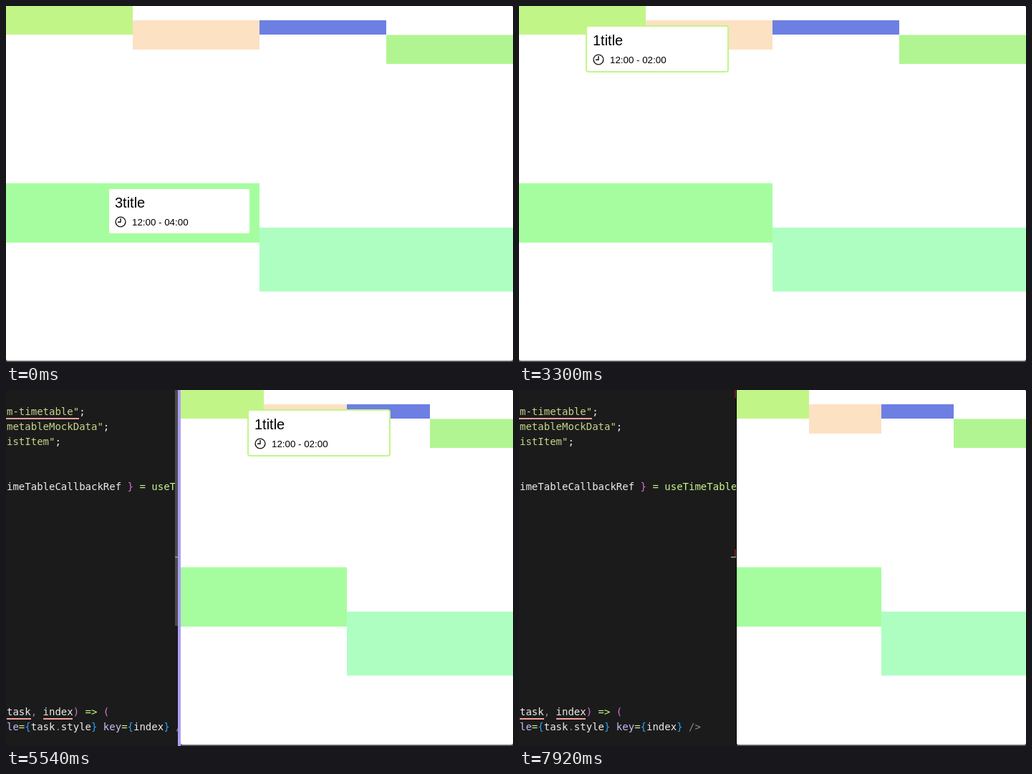
Recreate the animation shown at these times as an HTML page with a canvas. Size 708x498 px, loop 7990 ms.

```html
<!DOCTYPE html>
<html lang="en">
<head>
<meta charset="utf-8">
<title>Resizable timetable</title>
<style>
html, body { margin: 0; width: 100%; height: 100%; overflow: hidden; background: #fff; }
canvas { display: block; width: 708px; height: 498px; }
</style>
</head>
<body>
<canvas id="stage" width="708" height="498"></canvas>
<script>
const ctx = document.getElementById('stage').getContext('2d');
const W = 708, H = 498, LOOP = 7990, STEP = 70;

const LIME = '#c2f587', PEACH = '#fce1c3', BLUE = '#6d7fe3', GREEN = '#a6fd9f';

// Column start and span are fractions of the pane width.
const tasks = [
  { col: 0, span: .25, top: 0, bottom: 40, color: LIME },
  { col: .25, span: .25, top: 20, bottom: 61, color: PEACH },
  { col: .5, span: .25, top: 20, bottom: 40, color: BLUE },
  { col: .75, span: .25, top: 40.5, bottom: 81, color: '#b0f592' },
  { col: 0, span: .5, top: 248, bottom: 331, color: GREEN },
  { col: .5, span: .5, top: 310, bottom: 399.5, color: '#aefec2' }
];

const cards = [
  { from: 0, to: 500, x: 142, y: 254, title: '3title', time: '12:00 - 04:00', color: GREEN },
  { from: 640, to: 1340, x: 282.5, y: 31, title: '4title', time: '01:00 - 02:00', color: BLUE },
  { from: 1410, to: 1900, x: 139.5, y: 36, title: '2title', time: '01:00 - 03:00', color: PEACH },
  { from: 2670, to: 3300, x: 117.5, y: 34, title: '2title', time: '01:00 - 03:00', color: PEACH },
  { from: 3300, to: 7360, x: 93, y: 27, title: '1title', time: '12:00 - 02:00', color: LIME }
];

const STRING = '#c6d58a', PLAIN = '#ececec', CALL = '#c8f58c', PINK = '#da70d6',
      BRACE = '#2ba3f7', ATTR = '#cbbcfa', DIM = '#8a8a8a';

const code = [
  { y: 35, parts: [['m-timetable"', STRING], [';', PLAIN]] },
  { y: 56, parts: [['metableMockData"', STRING], [';', PLAIN]] },
  { y: 77, parts: [['istItem"', STRING], [';', PLAIN]] },
  { y: 140, parts: [['imeTableCallbackRef ', PLAIN], ['} ', PINK], ['= useTimeTable', CALL], ['(', PINK]] },
  { y: 455, parts: [['task', PLAIN], [', ', DIM], ['index', PLAIN], [') ', PINK], ['=> ', CALL], ['(', PINK]] },
  { y: 476, parts: [['le', ATTR], ['=', CALL], ['{', BRACE], ['task', PLAIN], ['.', DIM], ['style', PLAIN], ['} ', BRACE],
    ['key', ATTR], ['=', CALL], ['{', BRACE], ['index', PLAIN], ['} ', BRACE], ['/>', DIM]] }
];
const underlines = [[0, 102, 39], [1, 35, 459], [52, 93, 459]];

const dragPath = [[4770, 0], [4840, 4], [5190, 96], [5540, 244], [5610, 268], [5890, 312], [6030, 314], [6170, 316]];

function slopeAt(i) {
  const a = dragPath[Math.max(i - 1, 0)], b = dragPath[Math.min(i + 1, dragPath.length - 1)];
  return (b[1] - a[1]) / (b[0] - a[0]);
}

function paneLeft(t) {
  if (t < 4840) return 0;
  if (t >= 6450) return 304;
  if (t >= 6170) return 316;
  if (t >= 5890 && t < 6030) return 312;
  const i = dragPath.findIndex((p, k) => t < dragPath[k + 1][0]);
  const [t0, x0] = dragPath[i], [t1, x1] = dragPath[i + 1];
  const d = t1 - t0, u = (t - t0) / d, v = 1 - u;
  return v * v * (1 + 2 * u) * x0 + u * v * v * d * slopeAt(i) +
    u * u * (1 + 2 * v) * x1 - u * u * v * d * slopeAt(i + 1);
}

function fill(x, y, w, h, color) {
  ctx.fillStyle = color;
  ctx.fillRect(x, y, w, h);
}

function text(str, x, y, font, color) {
  ctx.font = font;
  ctx.fillStyle = color;
  ctx.fillText(str, x, y);
}

function roundRect(x, y, w, h, r, color) {
  ctx.fillStyle = color;
  ctx.beginPath();
  ctx.roundRect(x, y, w, h, r);
  ctx.fill();
}

function drawPane(left) {
  fill(left, 0, W - left, H, '#505050');
  roundRect(left, 0, W - left, 496.3, [left ? 0 : 2, 2, 3, 3], '#fff');
  const width = W - left;
  for (const k of tasks) {
    const x = Math.round(left + k.col * width), end = Math.round(left + (k.col + k.span) * width);
    fill(x, k.top, end - x, k.bottom - k.top, k.color);
  }
}

function drawCard(card, left) {
  ctx.save();
  ctx.translate(card.x + left, card.y);
  roundRect(0, 0, 200, 66, 4, card.color);
  roundRect(2, 2, 196, 62, 2, '#fff');
  text(card.title, 10, 28, '20px "Liberation Sans", Arial, sans-serif', '#000');
  text(card.time, 34, 52.5, '13.333px "Liberation Sans", Arial, sans-serif', '#000');
  ctx.strokeStyle = '#111';
  ctx.lineWidth = 1.4;
  ctx.beginPath();
  ctx.arc(18, 48, 6.9, 0, Math.PI * 2);
  ctx.moveTo(18, 43);
  ctx.lineTo(18, 48.3);
  ctx.lineTo(14, 48.3);
  ctx.stroke();
  ctx.restore();
}

function drawEditor(left, t) {
  ctx.save();
  ctx.beginPath();
  ctx.rect(0, 0, left, H);
  ctx.clip();
  fill(0, 0, left, H, '#1b1b1b');
  const font = '14px "DejaVu Sans Mono", monospace';
  for (const line of code) {
    let x = 1;
    for (const [str, color] of line.parts) {
      text(str, x, line.y, font, color);
      x += ctx.measureText(str).width;
    }
  }
  for (const [x0, x1, y] of underlines) fill(x0, y, x1 - x0, 2, '#f0a39d');

  // The scrollbar fades away once the drag is over.
  const fade = Math.min(1, Math.max(0, 1 - (t - 6870) / 840));
  ctx.globalAlpha = fade;
  fill(left - 8, 0, 7, 330, '#4b4b4b');
  ctx.globalAlpha = 1;
  const mark = `rgb(${150 - 10 * (1 - fade)}, ${40 + 100 * fade}, ${45 + 25 * fade})`;
  fill(left - 2.5, 0, 1.5, 11, mark);
  fill(left - 2.5, 223, 1.5, 11, mark);
  fill(left - 8, 233, 7, 1.5, '#a0a08c');
  fill(left - 1, 0, 1, H, '#000');
  ctx.restore();

  if (t < 6730) {
    ctx.globalAlpha = t < 6660 ? 1 : .5;
    fill(left - 4, 0, 4, H, '#ae9ff8');
    ctx.globalAlpha = 1;
  }
}

function draw(now) {
  const t = Math.floor((now % LOOP) / 10) * 10;
  const tick = t < 4840 ? t : 4840 + Math.floor((t - 4840) / STEP) * STEP;
  const left = Math.round(paneLeft(tick));
  drawPane(left);
  const card = cards.find(c => tick >= c.from && tick < c.to);
  if (card) drawCard(card, left);
  if (left) drawEditor(left, tick);
}

let start;
function loop(now) {
  start ??= now;
  draw(now - start);
  requestAnimationFrame(loop);
}
draw(0);
requestAnimationFrame(loop);
</script>
</body>
</html>
```
